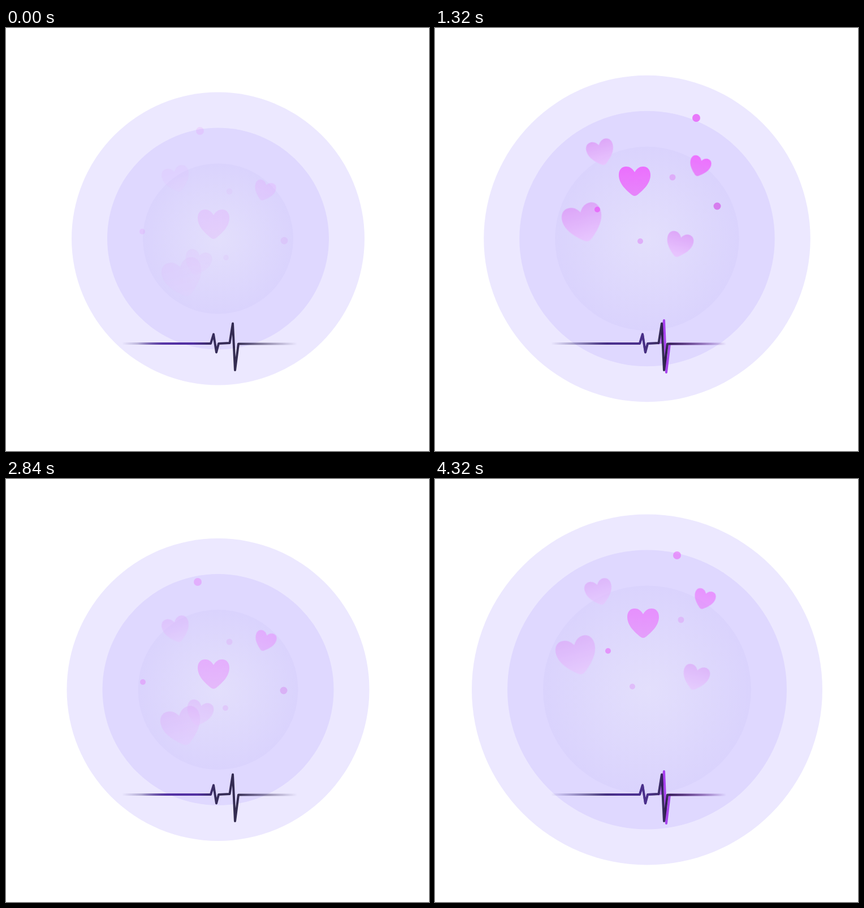
Write an HTML page without scripts that moves like this. It is 748 by 748 pixels and loops after 4360 ms.

```html
<!DOCTYPE html>
<html lang="en">
<head>
<meta charset="utf-8">
<title>Heartbeat</title>
<style>
html, body { margin: 0; width: 100%; height: 100%; overflow: hidden; background: #fff; }
svg { display: block; width: 100vw; height: 100vh; }

/* Rings grow for 12 ticks of 60 ms, then shrink for 3 */
.ring { animation: pulse 4360ms linear infinite; }
@keyframes pulse {
  0%, 20.64%, 41.28%, 61.92%, 82.56% {
    r: calc(259px - var(--d));
    animation-timing-function: steps(12);
  }
  16.51%, 37.15%, 57.79%, 78.44% {
    r: calc(310px - var(--d));
    animation-timing-function: steps(3);
  }
  99.08%, 100% { r: calc(310px - var(--d)); }
}

/* --a to --f: places along the way, --p0 to --p5: opacity there */
.m { animation: drift 4360ms linear infinite; }
@keyframes drift {
  0%, 61.92% {
    transform: translate(var(--a, 0, 0)); opacity: var(--p0, .14);
    animation-timing-function: steps(2);
  }
  2.75%, 64.67% {
    transform: translate(var(--b, 0, 0)); opacity: var(--p1, .36);
    animation-timing-function: steps(8);
  }
  13.76%, 75.68% {
    transform: translate(var(--c, 0, 0)); opacity: var(--p2, 1);
    animation-timing-function: steps(12);
  }
  30.27%, 92.2% {
    transform: translate(var(--d, 0, 0)); opacity: var(--p3, .88);
    animation-timing-function: steps(5);
  }
  37.15% {
    transform: translate(var(--e, 0, 0)); opacity: var(--p4, .6);
    animation-timing-function: steps(5);
  }
  44.03% {
    transform: translate(var(--f, 0, 0)); opacity: var(--p5, .36);
    animation-timing-function: steps(4);
  }
  49.54% { transform: translate(var(--f, 0, 0)); opacity: 0; }
  49.55%, 59.17% {
    transform: translate(var(--a, 0, 0)); opacity: 0;
    animation-timing-function: steps(2);
  }
  99.08%, 100% { transform: translate(var(--e, 0, 0)); opacity: var(--p4, .6); }
}
</style>
</head>
<body>
<svg viewBox="0 0 748 748">
  <defs>
    <path id="heart" d="M0-16C4-23 9-26 15-26C23-26 28-20 28-11C28 4 15 16 5 24Q0 28-5 24C-15 16-28 4-28-11C-28-20-23-26-15-26C-9-26-4-23 0-16Z"/>
    <path id="beat" d="M205 558H362L367 541.500L372 573.500L376 558L395.500 557L401 522.500L405 605L411 558.500H515"/>
    <filter id="blur" filterUnits="userSpaceOnUse" x="195" y="500" width="330" height="125">
      <feGaussianBlur stdDeviation=".7"/>
    </filter>
    <radialGradient id="core">
      <stop offset="0" stop-color="#e3dffc"/>
      <stop offset="1" stop-color="#dad3fd"/>
    </radialGradient>
    <linearGradient id="pink" x2="0" y2="1">
      <stop stop-color="#ee62ff"/>
      <stop offset="1" stop-color="#e87afa"/>
    </linearGradient>
    <linearGradient id="lilac" x2="0" y2="1">
      <stop stop-color="#dc9ff8"/>
      <stop offset="1" stop-color="#e9c4ff"/>
    </linearGradient>
    <linearGradient id="ink" gradientUnits="userSpaceOnUse" x1="205" x2="515" y1="0" y2="0">
      <stop stop-color="#3a2c80" stop-opacity="0"/>
      <stop offset=".32" stop-color="#2a1c5c" stop-opacity=".9"/>
      <stop offset=".66" stop-color="#20183c" stop-opacity=".9"/>
      <stop offset="1" stop-color="#3a2c60" stop-opacity="0"/>
    </linearGradient>
    <linearGradient id="echo" gradientUnits="userSpaceOnUse" x1="390" x2="515" y1="0" y2="0">
      <stop stop-color="#a63cf0" stop-opacity="0"/>
      <stop offset=".1" stop-color="#a63cf0"/>
      <stop offset=".4" stop-color="#9a38d8" stop-opacity=".7"/>
      <stop offset="1" stop-color="#b45cf0" stop-opacity="0"/>
    </linearGradient>
    <linearGradient id="soft">
      <stop stop-color="#fff" stop-opacity="0"/>
      <stop offset=".35" stop-color="#fff"/>
      <stop offset=".75" stop-color="#fff"/>
      <stop offset="1" stop-color="#fff" stop-opacity="0"/>
    </linearGradient>
    <mask id="streak" maskUnits="userSpaceOnUse" x="0" y="500" width="748" height="130">
      <rect class="m" x="-65" y="500" width="130" height="130" fill="url(#soft)"
        style="--a:298px,0px;--b:305px,0px;--c:342px,0px;--d:335px,0px;--e:345px,0px;--f:350px,0px;--p0:.9;--p1:.9;--p2:.85;--p3:.6;--p4:.65;--p5:0"/>
    </mask>
  </defs>

  <g transform="translate(375 372.500)">
    <circle class="ring" r="259" fill="#ece8ff" style="--d:0px"/>
    <circle class="ring" r="196" fill="#dfd8ff" style="--d:63px"/>
    <circle class="ring" r="133" fill="url(#core)" style="--d:126px"/>
  </g>

  <g fill="url(#lilac)">
    <g class="m" style="--a:299px,266px;--b:299px,265px;--c:297px,251px;--d:291px,219px;--e:288px,199px;--f:285px,184px">
      <use href="#heart" transform="rotate(-15) scale(.86) translate(2.200 2.600)"/>
    </g>
    <g class="m" style="--a:310px,440px;--b:308px,436px;--c:284px,395px;--d:259px,343px;--e:248px,311px;--f:242px,288px">
      <use href="#heart" transform="rotate(-15) scale(1.260) translate(2.200 2.600)"/>
    </g>
    <g class="m" style="--a:341px,414px;--b:344px,413px;--c:360px,407px;--d:434px,382px;--e:463px,350px;--f:478px,326px">
      <use href="#heart" transform="rotate(15) scale(.84) translate(-2.200 2.600)"/>
    </g>
  </g>
  <g fill="url(#pink)">
    <g class="m" style="--a:367px,347px;--b:367px,345px;--c:348px,306px;--d:353px,271px;--e:368px,255px;--f:372px,245px;--p5:0">
      <use href="#heart"/>
    </g>
    <g class="m" style="--a:459px,287px;--b:460px,286px;--c:460px,287px;--d:470px,244px;--e:478px,212px;--f:482px,190px">
      <use href="#heart" transform="rotate(18) scale(.67) translate(-2.500 2.600)"/>
    </g>
  </g>

  <g fill="#e868fa">
    <circle class="m" r="7" style="--a:343px,182px;--b:339px,182px;--c:406px,173px;--d:462px,159px;--e:428px,135px;--f:405px,121px"/>
    <circle class="m" r="5" style="--a:241px,360px;--b:242px,359px;--c:254px,348px;--d:287px,321px;--e:306px,304px;--f:314px,296px;--p5:0"/>
    <circle class="m" r="6.500" fill="#d672ec" style="--a:492px,376px;--b:491px,374px;--c:479px,352px;--d:499px,315px;--e:506px,300px;--f:510px,292px;--p4:0;--p5:0"/>
    <circle class="m" r="5.500" fill="#dfa8f9" style="--a:395px,289px;--b:395px,288px;--c:395px,288px;--d:420px,264px;--e:435px,249px;--f:443px,242px"/>
    <circle class="m" r="5" fill="#dfa8f9" style="--a:389px,406px;--b:388px,405px;--c:383px,399px;--d:363px,377px;--e:349px,367px;--f:341px,356px"/>
  </g>

  <g fill="none" stroke-width="4" stroke-linejoin="round" filter="url(#blur)">
    <g class="m" style="--p0:0;--p1:0;--p2:0;--p3:1;--p4:1;--p5:0">
      <path d="M394 558L400 556L405 517L409 609L415 558.500H515" stroke="url(#echo)"/>
    </g>
    <use href="#beat" stroke="url(#ink)"/>
    <g mask="url(#streak)">
      <use href="#beat" stroke="#5530a8"/>
    </g>
  </g>
</svg>
</body>
</html>
```
